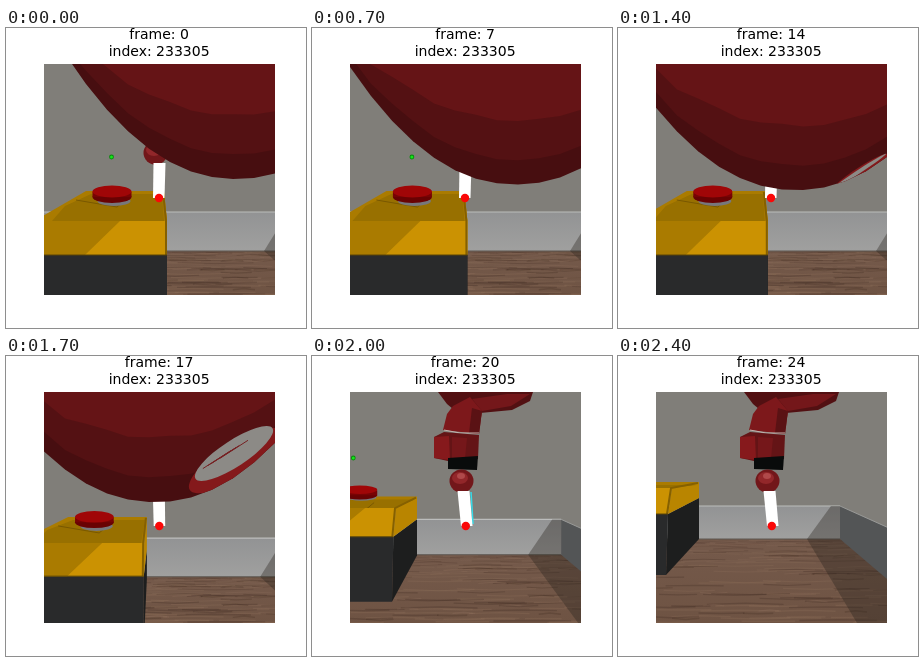
Animation, 300 px wide and 300 px high, one loop 2500 ms. Source, as an HTML page with a canvas:

```html
<!DOCTYPE html>
<html>
<head>
<meta charset="utf-8">
<style>
html, body { margin: 0; width: 100%; height: 100%; overflow: hidden; background: #fff; }
canvas { display: block; width: 300px; height: 300px; }
</style>
</head>
<body>
<canvas id="stage" width="300" height="300"></canvas>
<script>
const c = document.getElementById('stage').getContext('2d');
const STEP = 100, COUNT = 25;
const L = 38, T = 36, R = 269, B = 267;

const clamp = v => Math.max(0, Math.min(1, v));
const lerp = (a, b, k) => a + (b - a) * k;
const ease = v => { const u = clamp(v); return u * u * (3 - 2 * u); };

function seeded(s) {
  return () => (s = (s * 16807) % 2147483647) / 2147483647;
}

function path(p) {
  c.beginPath();
  for (let i = 0; i < p.length; i += 2) c.lineTo(p[i], p[i + 1]);
}

function poly(color, ...p) {
  c.fillStyle = color;
  path(p);
  c.fill();
}

function line(color, width, ...p) {
  c.strokeStyle = color;
  c.lineWidth = width;
  path(p);
  c.stroke();
}

function oval(color, x, y, rx, ry = rx, turn = 0) {
  c.fillStyle = color;
  c.beginPath();
  c.ellipse(x, y, rx, ry, turn, 0, Math.PI * 2);
  c.fill();
}

function fade(y0, y1, a, b) {
  const g = c.createLinearGradient(0, y0, 0, y1);
  g.addColorStop(0, a);
  g.addColorStop(1, b);
  return g;
}

// The camera drifts sideways, then pulls back
const drift = n => -.8 * n;
const pull = n => ease((n - 16) / 7);

function room(q) {
  const top = lerp(184, 150, q), base = lerp(223, 183, q);
  const corner = lerp(291, 222, q), shade = corner - 33, side = R - corner;
  poly('#807e79', L, T, R, T, R, B, L, B);
  poly(fade(base, B, '#755a4b', '#6e5343'), L, base, R, base, R, B, L, B);
  const rnd = seeded(41);
  for (let i = 0; i < 150; i++) {
    const d = rnd(), x = 20 + rnd() * 240, w = 20 + rnd() * 60;
    const y = base + 1 + d ** 1.5 * (B - base), bend = (rnd() - .5) * 3;
    line(i % 2 ? 'rgba(58,38,28,.25)' : 'rgba(150,120,98,.22)', .5 + d, x, y, x + w / 2, y + bend, x + w, y);
  }
  poly(fade(top, base, '#929394', '#a0a09f'), L, top, corner, top, corner, base, L, base);
  line('#bcbdbc', 1.2, L, top, corner, top);
  line('#5d5650', 1, L, base, corner, base);
  const dark = 'rgba(40,34,30,.36)';
  poly(dark, shade, base, shade + 50, B, R, B, R, base);
  poly(dark, shade, base, shade + 24, top, corner, top, corner, base);
  if (side > 0) {
    poly('#535556', corner, top, R, top + side * .45, R, base + side * .85, corner, base);
    line('#989997', 1, corner, top, R, top + side * .45);
  }
}

function box(n, q) {
  const s = drift(n), f = q ** .8;
  // Back corners follow q; the nearer front ones run ahead
  const back = lerp(158 + s, 81, q), backTop = lerp(163, 126, q);
  const fx = lerp(161 + s, 54, f), fy = lerp(193, 132, f);
  const ex = lerp(161 + s, 50, f), ey = lerp(227, 158, f);
  const gx = lerp(161 + s, 48, f), gy = lerp(300, 219, f);
  const ax = lerp(80 + s, -10, q), left = ax - 52;
  const midY = lerp(196, 142, q), footY = lerp(225, 183, q);

  poly('#1d1e1e', ex, ey, back, midY, back, footY, gx, gy);
  poly('#b98500', fx, fy, back, backTop, back, midY, ex, ey);
  poly('#292a2b', left, ey, ex, ey, gx, gy, left, gy);
  poly('#aa7b00', left, fy, ax, backTop, back, backTop, fx, fy);
  poly('#987000', left + 31, lerp(backTop, fy, .5), ax + 5, backTop + 3, back - 2, backTop + 3, fx - 3, fy, left + 18, fy);
  line('#795800', 1, ax - 10, backTop + 9, ax + 31, backTop + 16, ax + 43, backTop + 6);
  poly('#cb9202', left, fy, fx, fy, ex, ey, left, ey);
  poly('#aa7b00', left, fy, ax + 34, fy, ax - 1, ey, left, ey);
  line('#856000', 2, back - 1, backTop + 1, fx - 1, fy, ex - 1, ey);
  line('#584306', 1, left, ey, ex, ey);
  button(lerp(106 + s, 20, q), lerp(166, 117, q), q);
  const dx = lerp(105.5 + s, 10, q), dy = lerp(129, 84.5, q);
  oval('#078a0b', dx, dy, 2.4);
  oval('#16e51b', dx, dy, 1.5);
}

function button(x, y, q) {
  const w = 19.5 - 3 * q, h = 6 - 3 * q;
  oval('#77777c', x + 2, y + 7 - 3 * q, w - 3, h - 1);
  oval('#690203', x, y + 3, w, h);
  poly('#780304', x - w, y - 2, x + w, y - 2, x + w, y + 3, x - w, y + 3);
  oval('#a00607', x, y - 2.5, w, h);
}

function arm(n) {
  poly('#521012', 126, 36, 135, 48, 141, 53, 168, 57, 200, 54, 218, 45, 221, 36);
  poly('#74171a', 160, 43, 195, 38, 218, 38, 199, 50, 170, 55);
  poly('#7d181b', 141, 50, 158, 41, 170, 55, 167, 78, 131, 74, 135, 58);
  poly('#5a1214', 160, 52, 170, 55, 167, 78, 157, 77);
  line('#c3b2ad', 1, 132, 74, 148, 77, 167, 77);
  poly('#641416', 132, 76, 167, 79, 166, 103, 136, 105, 122, 102, 122, 81);
  poly('#86191c', 122, 81, 137, 80, 138, 104, 122, 102);
  poly('#75171a', 140, 81, 155, 82, 153, 103, 140, 104);
  poly('#090b0b', 136, 102, 166, 100, 165, 114, 136, 113);
  oval('#72171a', 149.5, 125, 12, 11.5);
  oval('#92272a', 148, 122, 8, 6);
  oval('#b0494a', 149, 120, 4, 3);
  const k = 2 * ease((n - 15) / 5);
  if (n > 17 && n < 23) line('#35dcea', 1.5, 159, 136, 161, 168);
  poly('#fff', 147.5 - k, 135, 159.5 - k, 135, 158.5 + k, 170, 147 + k, 170);
  oval('#fa0808', 153 + k * .4, 170, 4.2);
}

function dome(n) {
  const late = Math.max(0, n - 14);
  const cx = 230 - 3.7 * n - 2 * late ** 2, cy = 151 + .8 * n - 2.05 * late ** 2;
  const edge = (x, lift = 0, bend = 1) => cy - lift - bend * 95 * (Math.abs(x - cx) / 150) ** 2.1;
  const outline = (lift, bend, rough) => {
    const p = [R, T, L, T], rnd = seeded(7);
    for (let x = L; x <= R; x += 21) p.push(x, edge(x, lift, bend) + (rnd() - .5) * rough);
    return p;
  };
  c.save();
  path(outline(0, 1, 0));
  c.clip();
  poly('#470e10', L, T, R, T, R, B, L, B);
  poly('#541113', ...outline(25, .87, 3));
  poly('#651416', ...outline(65, .65, 6));
  if (n > 13) opening(clamp((n - 13.5) / 3.5), edge);
  c.restore();
}

// The shell is cut open along its lower right
function opening(k, edge) {
  const x = lerp(243, 228, k), y = edge(x) - 24 * k, long = 30 + 16 * k, turn = -.58;
  oval('#84191b', x + 1, y + 7 * k, long + 8 * k, 3 + 14 * k, turn);
  oval('#8c8a86', x, y, long, 13 * k, turn);
  const rnd = seeded(19);
  for (let i = 0; i < 4; i++) {
    const d = (8 + rnd() * 24) * k, sx = x - d - 6, sy = y + d * .6;
    line('#762022', k, sx, sy, sx + 28 * k, sy - 18 * k);
  }
}

function draw(n) {
  const q = pull(n);
  c.fillStyle = '#fff';
  c.fillRect(0, 0, 300, 300);
  c.save();
  c.beginPath();
  c.rect(L, T, R - L, B - T);
  c.clip();
  room(q);
  box(n, q);
  arm(n);
  if (n < 18) dome(n);
  c.restore();
  c.fillStyle = '#000';
  c.font = '14px "DejaVu Sans", sans-serif';
  c.textAlign = 'center';
  c.fillText('frame: ' + n, 153.1, 11);
  c.fillText('index: 233305', 153.1, 28);
}

const start = performance.now();
function tick() {
  draw(Math.floor((performance.now() - start) / STEP) % COUNT);
  requestAnimationFrame(tick);
}
tick();
</script>
</body>
</html>
```
